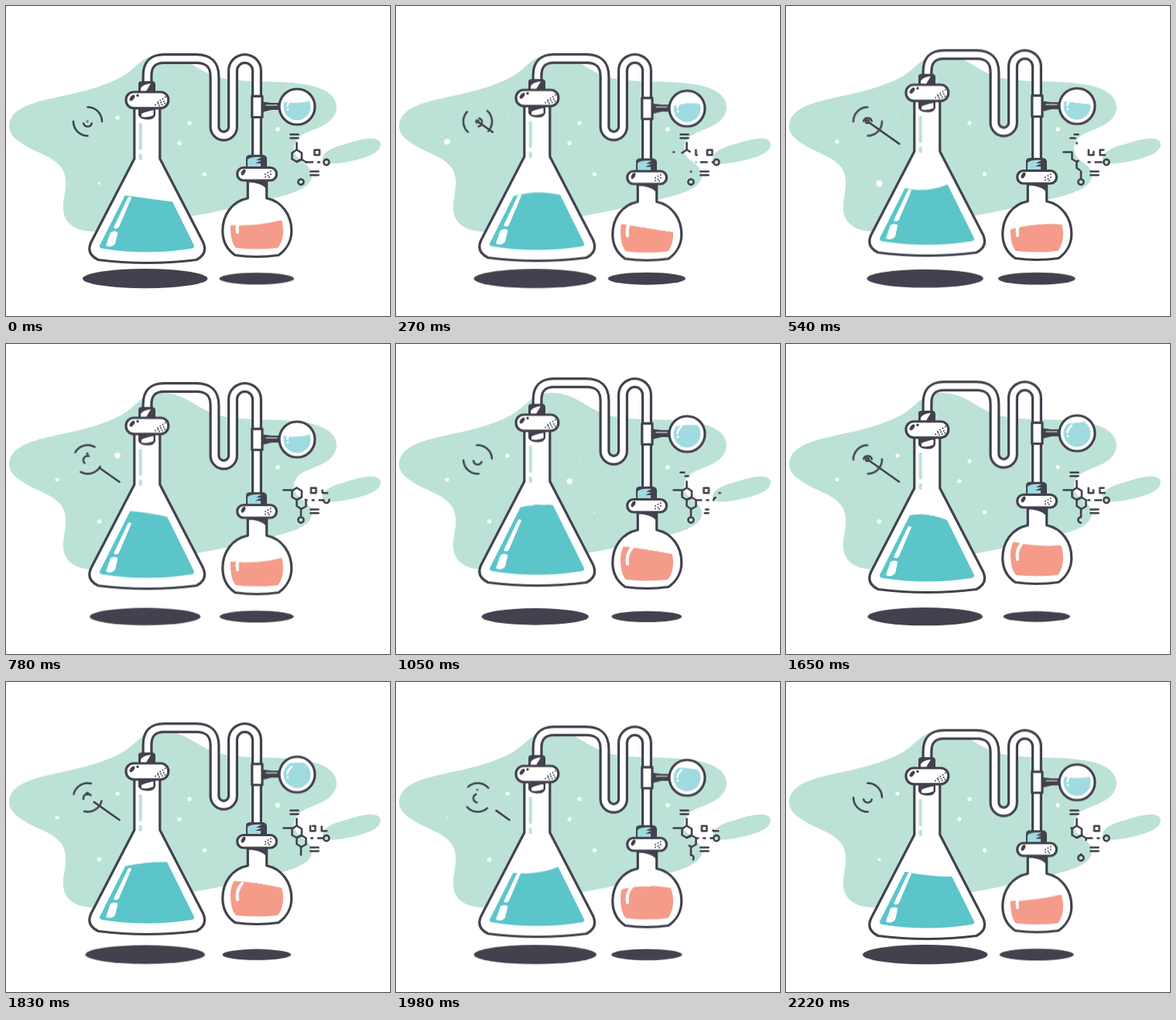
An HTML page for the animation above (2.25 s loop, 496x400 px).

```html
<!DOCTYPE html>
<html lang="en">
<head>
<meta charset="utf-8">
<title>Distillation</title>
<style>
  html, body { margin: 0; width: 100%; height: 100%; overflow: hidden; background: #fff; }
  svg { display: block; width: 496px; height: 400px; }

  :root { --ink: #42414d; --mint: #bce2d7; --ice: #9fdbe1; --wave: cubic-bezier(.364, 0, .636, 1); }
  .line { fill: none; stroke: var(--ink); stroke-width: 2.6; stroke-linecap: round; stroke-linejoin: round; }
  .glass { fill: #fff; stroke: var(--ink); stroke-width: 3.2; stroke-linejoin: round; }
  .ink { fill: var(--ink); }
  .mint { fill: var(--mint); }
  .speck { fill: none; stroke: var(--ink); stroke-width: 2; stroke-linecap: round; stroke-dasharray: 0 3.9; }
  .shine { fill: none; stroke: #fff; stroke-linecap: round; }
  .tube { fill: none; stroke: var(--ink); stroke-width: 14; }
  .bore { stroke: #fff; stroke-width: 7.6; }

  /* floating parts, each one lagging a little behind the last */
  .bob, .shadow, .level { animation: bob 1125ms var(--wave) var(--d, 0ms) infinite alternate; }
  .shadow { animation-name: shrink; transform-box: fill-box; transform-origin: center; }
  .level { animation-name: level; }
  @keyframes bob { from { transform: translateY(var(--y)); } to { transform: translateY(calc(var(--y) - 20px)); } }
  @keyframes shrink { to { transform: scale(.855); } }
  @keyframes level { from { transform: translateY(var(--a)); } to { transform: translateY(calc(var(--a) * -1)); } }

  /* sloshing liquids */
  .tilt { animation: tilt 375ms var(--wave) var(--d, 0ms) infinite alternate; }
  @keyframes tilt { from { transform: skewY(var(--s)); } to { transform: skewY(calc(var(--s) * -1)); } }
  .surface { animation: 375ms var(--wave) var(--d) infinite alternate; }
  .teal { fill: #5bc5ca; animation-name: teal; }
  .pink { fill: #f59b89; animation-name: pink; }
  .pale { fill: var(--ice); animation-name: pale; }
  @keyframes teal {
    from { d: path("M60 239H154Q183 229 212 239H300V360H60Z"); }
    to { d: path("M60 239H154Q183 249 212 239H300V360H60Z"); }
  }
  @keyframes pink {
    from { d: path("M200 276H288Q324 268 360 276H450V360H200Z"); }
    to { d: path("M200 276H288Q324 284 360 276H450V360H200Z"); }
  }
  @keyframes pale {
    from { d: path("M330 121H358Q376 116 394 121H420V170H330Z"); }
    to { d: path("M330 121H358Q376 126 394 121H420V170H330Z"); }
  }

  /* twinkling dots */
  .dots circle {
    fill: #fff; transform-box: fill-box; transform-origin: center;
    animation: blink 2250ms linear var(--d) infinite;
  }
  .dots .quick { animation-name: quick; }
  @keyframes blink {
    0%, 35.6%, 100% { transform: scale(1); }
    11.1%, 17.8% { transform: scale(0); }
    28.9% { transform: scale(1.55); }
  }
  @keyframes quick {
    0%, 28%, 100% { transform: scale(1); }
    6%, 8% { transform: scale(0); }
    18% { transform: scale(1); }
    23% { transform: scale(1.2); }
  }

  /* strokes that erase and redraw themselves */
  .trim { stroke-dasharray: 1 1.1; animation: redraw 2250ms linear var(--d) infinite; }
  .slow { animation-name: slow; }
  .long { animation-name: long; }
  @keyframes redraw {
    0% { stroke-dashoffset: 0; }
    11.1%, 22.2% { stroke-dashoffset: -1.05; }
    33.3%, 100% { stroke-dashoffset: -2.1; }
  }
  @keyframes slow {
    0% { stroke-dashoffset: 0; }
    14% { stroke-dashoffset: -1.05; }
    33%, 100% { stroke-dashoffset: -2.1; }
  }
  @keyframes long {
    0% { stroke-dashoffset: 0; }
    31%, 35.6% { stroke-dashoffset: -1.05; }
    62%, 100% { stroke-dashoffset: -2.1; }
  }
  .square { animation: slide 2250ms linear var(--d) infinite; }
  .square path { stroke-dasharray: 1 1.1; animation: box 2250ms linear var(--d) infinite; }
  @keyframes slide {
    0% { transform: translate(387px, 189px) rotate(0deg); }
    49.99% { transform: translate(401.7px, 189px) rotate(0deg); }
    50% { transform: translate(401.7px, 189px) rotate(180deg); }
    100% { transform: translate(416.5px, 189px) rotate(180deg); }
  }
  @keyframes box {
    0% { stroke-dashoffset: -1.05; }
    35.6%, 62.7% { stroke-dashoffset: -2.1; }
    100% { stroke-dashoffset: -3.15; }
  }
  .dash { stroke-dasharray: 10 5 4 5; stroke-linecap: butt; animation: march 1125ms linear infinite; }
  @keyframes march { to { stroke-dashoffset: -24; } }

  /* spinning mark: eased turns in step with the line */
  .turn { transform-origin: 105.5px 149px; animation: turn 1125ms var(--wave) infinite; }
  .back { transform-origin: 105.5px 150px; animation: back 1125ms var(--wave) infinite; }
  .sweep { stroke-dasharray: 1 1.1; animation: sweep 1125ms var(--wave) infinite; }
  .bead { transform-origin: 105px 149px; animation: bead 1125ms linear infinite; }
  @keyframes turn { 50% { transform: rotate(90deg); } 100% { transform: rotate(180deg); } }
  @keyframes back { 50% { transform: rotate(-180deg); } 100% { transform: rotate(-360deg); } }
  @keyframes sweep {
    0% { stroke-dashoffset: -1.05; }
    50% { stroke-dashoffset: -2.1; }
    100% { stroke-dashoffset: -3.15; }
  }
  @keyframes bead {
    0% { transform: translateY(0) scale(.4); }
    25% { transform: translateY(0) scale(.85); }
    50% { transform: translateY(0) scale(1); }
    76% { transform: translateY(-10px) scale(.4); }
    85%, 97% { transform: translateY(0) scale(0); }
    100% { transform: translateY(0) scale(.4); }
  }
</style>
</head>
<body>
<svg viewBox="0 0 496 400">
  <defs>
    <clipPath id="cone"><path d="M170 212L121 309Q120 312 125 313Q182 322 239 313Q244 312 243 309L195 212Z"/></clipPath>
    <clipPath id="round"><path d="M290 285C290 300 293 308 297 312Q324 315 351 312C356 306 358 298 358 290C358 270 346 252 324 252C302 252 290 268 290 285Z"/></clipPath>
    <clipPath id="ball"><circle cx="376" cy="130" r="17.5"/></clipPath>
    <path id="pipe" d="M182.5 103V90Q182.5 68 204 68H246Q269.5 68 269.5 91V156A11.75 11.75 0 0 0 293 156V83.5A15.5 15.5 0 0 1 324 83.5V205"/>
  </defs>

  <g class="mint">
    <path d="M4 155C5 134 28 126 60 119C92 112 125 105 150 91C170 79 176 63 200 63C234 63 244 84 278 93C312 100 350 95 385 101C412 105 427 116 427 131C426 151 403 157 387 164C371 171 368 186 377 196C386 204 396 209 395 220C393 237 366 243 335 251C290 262 245 271 205 277C170 283 140 291 112 291C86 290 72 278 74 255C76 239 81 224 72 209C60 193 39 190 20 177C9 170 4 163 4 155Z"/>
    <path d="M409 198C409 187 424 182 442 177C460 171 482 167 484 178C484 190 464 196 446 200C428 204 409 206 409 198Z"/>
  </g>

  <g class="dots">
    <circle cx="144" cy="144" r="2.6" style="--d:-2150ms"/>
    <circle cx="237" cy="151" r="2.6" style="--d:-1640ms"/>
    <circle cx="224" cy="177" r="2.6" style="--d:-1900ms"/>
    <circle cx="256.5" cy="217" r="2.6" style="--d:-1670ms"/>
    <circle cx="120.5" cy="229" r="2.8" style="--d:-2350ms"/>
    <circle cx="66" cy="175" r="2.5" style="--d:-400ms"/>
    <circle cx="351" cy="159" r="2.7" class="quick" style="--d:-990ms"/>
  </g>

  <g class="line">
    <path class="turn" d="M105.5 130.5A18.5 18.5 0 0 1 124 149M105.5 167.5A18.5 18.5 0 0 1 87 149"/>
    <path class="back" d="M100.2 151.5A5.5 5.5 0 0 0 110.8 151.5"/>
    <circle class="bead" cx="105" cy="149" r="2"/>
    <path class="sweep" pathLength="1" d="M107.5 150.5L146.5 178"/>
  </g>

  <g class="line">
    <path class="trim" pathLength="1" style="--d:-1830ms" d="M367.5 165.7H377.5"/>
    <path class="trim" pathLength="1" style="--d:-1800ms" d="M377.5 170.5H367.5"/>
    <path class="trim" pathLength="1" style="--d:-1920ms" d="M375.5 185V176.5"/>
    <path class="trim slow" pathLength="1" style="--d:-2200ms" d="M369.5 189.5V197.5L375.5 201L382 197.5V189.5L375.5 185.5Z"/>
    <path class="trim" pathLength="1" style="--d:-255ms" d="M358.5 188.5H369"/>
    <path class="trim long" pathLength="1" style="--d:-450ms" d="M375.5 201V209L381.5 213L387.5 209.5V201.5L382 198Z"/>
    <path class="trim" pathLength="1" style="--d:-250ms" d="M381 213.5V223"/>
    <path class="trim slow" pathLength="1" style="--d:-750ms" d="M381 223.4A3.6 3.6 0 1 1 380.9 223.4"/>
    <path class="trim slow" pathLength="1" style="--d:-1610ms" d="M410.3 201.5A3.6 3.6 0 1 1 410.3 201.6"/>
    <path class="trim slow" pathLength="1" style="--d:-1400ms" d="M393.5 213.5H403.5"/>
    <path class="trim slow" pathLength="1" style="--d:-1360ms" d="M393.5 218.3H403.5"/>
    <path class="dash" d="M387 201.5H410"/>
    <g class="square" style="--d:0ms"><path pathLength="1" d="M-3.2 -3.2V3.2H3.2V-3.2Z"/></g>
    <g class="square" style="--d:-1125ms"><path pathLength="1" d="M-3.2 -3.2V3.2H3.2V-3.2Z"/></g>
  </g>

  <ellipse class="ink shadow" cx="179.7" cy="351.7" rx="80.7" ry="12.6"/>
  <ellipse class="ink shadow" cx="323.8" cy="351.7" rx="50.2" ry="8" style="--d:-1875ms"/>

  <g class="bob" style="--y:.6px;--d:-2125ms">
    <use href="#pipe" class="tube"/>
    <use href="#pipe" class="tube bore"/>
  </g>

  <g class="bob" style="--y:2.3px;--d:-2000ms">
    <path class="ink" d="M331 123.5L343 125H355V134H343L331 137Z"/>
    <path class="shine" stroke-width="1.2" d="M336 128H350"/>
    <rect class="glass" x="317.8" y="116.3" width="13.2" height="27.2"/>
    <circle class="glass" cx="376" cy="130" r="23"/>
    <g clip-path="url(#ball)">
      <g class="level" style="--a:5px;--d:-1800ms">
        <g class="tilt" style="--s:-7deg;--d:-585ms;transform-origin:376px 121px">
          <path class="surface pale" style="--d:-400ms" d="M330 121H358Q376 116 394 121H420V170H330Z"/>
        </g>
      </g>
    </g>
    <path class="shine" stroke-width="2.6" d="M369 120Q364 124 363.5 129M364 133.5V134"/>
  </g>

  <g class="bob" style="--y:5px;--d:-1875ms">
    <path class="glass" d="M312.3 226V248C291.5 252 279.8 270 279.8 290C279.8 304 286.5 315 296 321.5Q324 325.5 352 321.5C361.500 315 368.800 304 368.800 290C368.800 270 356.500 252 336.700 248V226Z"/>
    <path class="ink" d="M313 224H337V238Q334 229 313 227Z"/>
    <g clip-path="url(#round)">
      <g class="level" style="--a:6px;--d:-1875ms">
        <g class="tilt" style="--s:-9deg;--d:-97ms;transform-origin:324px 276px">
          <path class="surface pink" style="--d:-285ms" d="M200 276H288Q324 268 360 276H450V360H200Z"/>
        </g>
      </g>
      <path class="shine" stroke-width="4" d="M305 271Q297 279 299 292"/>
    </g>
    <path class="ink" d="M310 208V196Q310 192 316 192H332Q337 193 337 197V208Z"/>
    <path fill="#9fdbe1" d="M312 208V198Q317 194 330 195L323 199H330L322 203H329V208Z"/>
    <rect class="glass" x="298.7" y="208.5" width="50.8" height="16.5" rx="8"/>
    <ellipse class="ink" cx="306.5" cy="214.5" rx="2.3" ry="4.2" transform="rotate(30 306.5 214.5)"/>
    <path class="speck" d="M335 217L343 212.5M335 220.5L344 216M340 221H342"/>
  </g>

  <g class="bob" style="--y:0px">
    <path class="glass" d="M165.800 130V197L109.800 305Q103 320 119 327.500Q150 331.500 182 331.500Q215 331.500 246 327.500Q261 320 254.800 305L198.800 197V130Z"/>
    <path fill="none" stroke="#bce2d7" stroke-width="4.2" stroke-linecap="round" d="M173.7 153V184M173.7 192.5V197"/>
    <g clip-path="url(#cone)">
      <g class="level" style="--a:9.5px;--d:-2182ms">
        <g class="tilt" style="--s:9deg;transform-origin:183px 239px">
          <path class="surface teal" style="--d:-562ms" d="M60 239H154Q183 229 212 239H300V360H60Z"/>
        </g>
      </g>
      <path fill="#fff" d="M157.5 247Q160 245 162 247.5L146 285Q143 289 139 286ZM135 292Q140 289 144.5 292L141 307Q135 313 129 309Z"/>
    </g>
    <path class="ink" d="M171 130H193V141Q191 147 182 146.5Q173 146 171 141Z"/>
    <path fill="#fff" d="M175 143V139Q184 135 190.5 134.5V141Q184 144.5 175 143Z"/>
    <path class="ink" d="M171 111V100Q171 97 176 97H188Q193 97 193 101V111Z"/>
    <path fill="#fff" d="M174 110V106Q177 101 187 100L181 110Z"/>
    <rect class="glass" x="155" y="111" width="54.8" height="20.8" rx="10"/>
    <ellipse class="ink" cx="163" cy="118.5" rx="2.4" ry="4.5" transform="rotate(38 163 118.5)"/>
    <circle class="ink" cx="170" cy="115.5" r="1.7"/>
    <path class="speck" d="M196 124L206 117.5M193 127.5L207 121.5M198 128.5L206 125.5"/>
  </g>
</svg>
</body>
</html>
```
